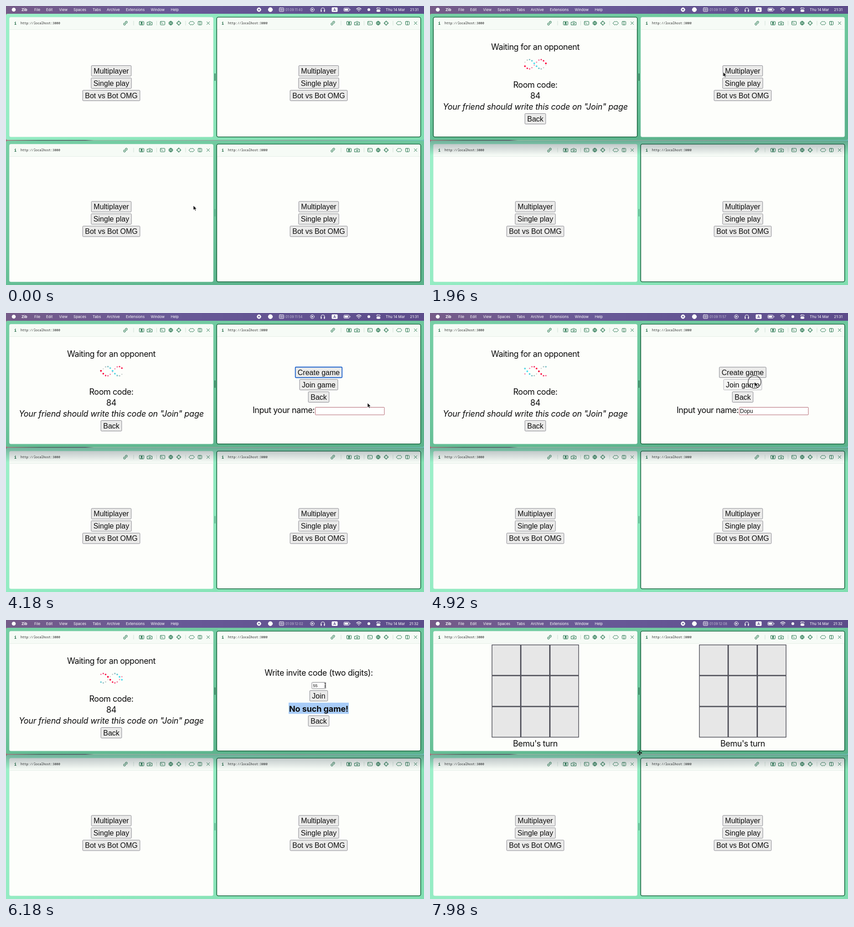
An HTML page that plays this animation: 917x611 px, repeating every 8000 ms.

```html
<!DOCTYPE html>
<html lang="en">
<head>
<meta charset="utf-8">
<title>Two player lobby</title>
<style>
html, body { margin: 0; width: 100%; height: 100%; overflow: hidden; background: #62c898; }
svg { display: block; width: 100vw; height: 100vh; }
text { white-space: pre; }
.bar { font: 8px Inter, sans-serif; fill: #fff; }
.url { font: 6.9px "Noto Sans Mono", monospace; fill: #222; }
.btn { font: 16px "Liberation Sans", Arial, sans-serif; fill: #0c0c0c; text-anchor: middle; }
.val { font: 12px "Liberation Sans", Arial, sans-serif; fill: #111; }
.body { font: 18px Inter, sans-serif; letter-spacing: -.45px; fill: #0c0c0c; text-anchor: middle; }
.hint { font-style: italic; letter-spacing: -.22px; }
.ico { fill: none; stroke: #1d7048; stroke-width: 1; stroke-linejoin: round; stroke-linecap: round; }
.sys { fill: none; stroke: #fff; stroke-width: 1; stroke-linecap: round; }
</style>
</head>
<body>
<svg viewBox="0 0 917 611" preserveAspectRatio="none">
  <defs>
    <linearGradient id="menubar">
      <stop offset="0" stop-color="#755b88"/><stop offset=".4" stop-color="#685997"/>
      <stop offset="1" stop-color="#5c4c8a"/>
    </linearGradient>
    <linearGradient id="bright" x2="1" y2=".4">
      <stop offset="0" stop-color="#9cf0c9"/><stop offset=".5" stop-color="#90eac0"/>
      <stop offset="1" stop-color="#80deb0"/>
    </linearGradient>
    <linearGradient id="deep" x2=".6" y2="1">
      <stop offset="0" stop-color="#76cfa5"/><stop offset=".6" stop-color="#6ac49a"/>
      <stop offset="1" stop-color="#5ab28b"/>
    </linearGradient>
    <linearGradient id="shade" x2="0" y2="1">
      <stop offset="0" stop-color="#123" stop-opacity=".3"/>
      <stop offset="1" stop-color="#123" stop-opacity="0"/>
    </linearGradient>
    <linearGradient id="wall">
      <stop offset="0" stop-color="#b0707c"/><stop offset=".08" stop-color="#4a5a58"/>
      <stop offset=".19" stop-color="#5a4a60"/><stop offset=".21" stop-color="#94b8a4"/>
      <stop offset=".7" stop-color="#93949a"/><stop offset="1" stop-color="#6cc0b8"/>
    </linearGradient>
    <g id="tools" class="ico">
      <g transform="rotate(-45 262 37.5)">
        <path d="M261 35.5h-2a2 2 0 0 0 0 4h2M263 35.5h2a2 2 0 0 1 0 4h-2M260 37.5h4"/>
      </g>
      <path d="M280 33v9M330.500 33v9M394 33v9" stroke="#cfe0d6"/>
      <rect x="292.500" y="34" width="10" height="7.500" rx="1"/>
      <circle cx="297.500" cy="37" r="1.600" fill="#1d7048"/><path d="M295 40h5"/>
      <path d="M310 35.500h2.500l1-1.500h3.500l1 1.500h2.500v6h-10.500z"/><circle cx="315.300" cy="38.200" r="1.700"/>
      <rect x="338.500" y="33.800" width="10" height="7.500" rx="1"/><path d="M340.500 36l1.200 1-1.200 1M343 38h1.500"/>
      <circle cx="361.500" cy="37.500" r="4.200"/>
      <path d="M357.500 36h8M357.500 39h8M361.500 33.500l-2 4 2 4M361.500 33.500l2 4-2 4"/>
      <circle cx="379" cy="37.500" r="3.800"/><path d="M379 32.500v3M379 39.500v3M374 37.500h3M381 37.500h3"/>
      <path d="M401.500 37.500l3.500-3.800h1.200q1.300 2.600 2.600 0h1.200l3.500 3.800-3.500 3.800h-1.200q-1.300-2.600-2.600 0h-1.200z"/>
      <rect x="421.500" y="33.800" width="8" height="7.500" rx="1"/><path d="M425.500 34v7"/>
      <path d="M440.500 34.500l6 6M446.500 34.500l-6 6"/>
    </g>
    <path id="arrow" d="M0 0v10l2.400-2.200 1.600 3.700 1.800-.8-1.600-3.500h3.200z" fill="#000" stroke="#fff" stroke-width=".8"/>
    <path id="beam" d="M-2-5q2 0 2 1.500q0-1.500 2-1.500M0-4v8M-2 5q2 0 2-1.500q0 1.500 2 1.500M-1.200 1h2.400" fill="none" stroke="#222" stroke-width=".9"/>
    <path id="cross" d="M-4 0h8M0-4v8M-3-1.500l-1.500 1.500 1.500 1.500M3-1.500l1.500 1.500-1.500 1.500M-1.500-3l1.500-1.500 1.500 1.500M-1.500 3l1.500 1.500 1.500-1.500" fill="none" stroke="#111" stroke-width="1.300"/>
  </defs>
  <g id="scene"></g>
</svg>
<script>
const scene = document.getElementById('scene');
const ctx = document.createElement('canvas').getContext('2d');
const HOST = 'Bemu', GUEST = 'Dopu';
const LOOP = 8000, GREEN = '#17633c', BLUE = '#1c62cc';

// Steps at which the user presses the mouse
const clicks = [9, 16, 33, 47, 58, 77, 94, 107, 114, 122, 140, 152];
// Pointer path: step, x, y
const path = [
  [1, 411, 437], [3, 411, 437], [8, 240, 146], [11, 240, 146], [15, 253, 222], [27, 253, 222],
  [32, 240, 134], [35, 240, 134], [45, 690, 146], [49, 690, 146], [56, 697, 216], [64, 697, 216],
  [74, 700, 134], [80, 700, 134], [90, 793, 197], [94, 740, 215], [101, 740, 215], [106, 712, 151],
  [110, 712, 151], [114, 690, 143], [119, 690, 143], [121, 688, 168], [124, 688, 168],
  [128, 750, 194], [133, 700, 143], [147, 700, 143], [151, 690, 168], [156, 690, 168],
  [171, 460, 291], [172, 460, 291]
];

const between = (n, a, b) => n >= a && n < b;
const typed = (s, n, from, gap) => s.slice(0, Math.max(0, Math.floor((n - from) / gap) + 1));
const text = (cls, x, y, s, extra = '') => `<text class="${cls}" x="${x}" y="${y}" ${extra}>${s}</text>`;
const rect = (x, y, w, h, attrs) => `<rect x="${x}" y="${y}" width="${w}" height="${h}" ${attrs}/>`;
const move = (x, y, s) => `<g transform="translate(${x} ${y})">${s}</g>`;

function button(label, y, look = '') {
  ctx.font = '16px "Liberation Sans", Arial, sans-serif';
  const w = ctx.measureText(label).width + 10;
  const stroke = look === 'focus' ? BLUE : look === 'pressed' ? '#b4b4ba' : '#85858d';
  return rect(231 - w / 2, y - 11.5, w, 23, `rx="1.5" fill="${look === 'pressed' ? '#f5f5f4' : '#ebebea'}"
    stroke="${stroke}" stroke-width="${look === 'focus' ? 1.8 : 1}"`) + text('btn', 231, y + 5.6, label);
}

const menu = () => button('Multiplayer', 142) + button('Single play', 169) + button('Bot vs Bot OMG', 196);

function form(n, { name, focus, error, create, join }) {
  const border = focus ? BLUE : error ? '#b0626e' : '#85858d';
  let s = button('Create game', 130, create) + button('Join game', 157, join) + button('Back', 184);
  s += text('body', 222, 219, 'Input your name:', 'style="text-anchor:end"');
  s += rect(223.5, 206.5, 151.5, 16.5, `rx="1" fill="#fff" stroke="${border}" stroke-width="${focus ? 1.8 : 1}"`);
  s += text('val', 225, 219.3, name);
  ctx.font = '12px "Liberation Sans", Arial, sans-serif';
  if (focus && n % 6 < 2) s += rect(226 + ctx.measureText(name).width, 208.5, .8, 12.5, 'fill="#333"');
  return s;
}

// Two strands of ten dots, half a turn apart
function helix(n) {
  let s = '';
  for (let i = 0; i < 10; i++) {
    const x = 208.3 + 5.1 * i, a = 2 * Math.PI * (x - 226 + 4.25 * (n - 62)) / 51;
    for (const side of [1, -1]) {
      const front = (1 + side * Math.cos(a)) / 2, mix = (p, q) => Math.round(p + (q - p) * front);
      const [r, g, b, o] = side > 0
        ? [mix(233, 255), mix(12, 0), mix(89, 51), .5 + .5 * front]
        : [mix(53, 70), mix(58, 223), mix(57, 240), .15 + .85 * front];
      s += `<circle cx="${x}" cy="${127.5 + side * 10.3 * Math.sin(a)}" r="${1.25 + .65 * front}"
        fill="rgb(${r},${g},${b})" fill-opacity="${o}"/>`;
    }
  }
  return s;
}

const waiting = n => text('body', 231, 96, 'Waiting for an opponent') + helix(n) +
  text('body', 231, 178.5, 'Room code:') + text('body', 231, 202.5, '84') +
  text('body hint', 231, 227, 'Your friend should write this code on "Join" page') +
  button('Back', 247);

function joinPage(n) {
  const code = n < 140 ? typed('55', n, 115, 3) : typed('84', n, 142, 2);
  const focus = between(n, 114, 122) || between(n, 140, 152), failed = n >= 123;
  let s = text('body', 231, 122, 'Write invite code (two digits):', 'style="letter-spacing:-.35px"');
  s += rect(216, 136.5, 30.5, 14, `rx="1.5" fill="#fff" stroke="${focus ? BLUE : '#808086'}" stroke-width="${focus ? 1.8 : 1}"`);
  s += text('val', 218.5, 146.8, code, 'style="font-size:9px"') + button('Join', 166);
  if (failed) {
    if (between(n, 129, 140)) s += rect(165, 181, 132, 24.5, 'fill="#a8ccf8"');
    s += text('body', 231, 201, 'No such game!', 'style="font-weight:700;letter-spacing:-.1px"');
  }
  return s + button('Back', failed ? 221 : 194);
}

function board() {
  let s = '';
  for (let i = 0; i < 9; i++)
    s += rect(136 + 63.8 * (i % 3), 54.5 + 67.8 * Math.floor(i / 3), 62.5, 66.5,
      'fill="#e7e7e7" stroke="#3b3b46" stroke-width="1.3"');
  return s + text('body', 231, 276.5, HOST + "'s turn");
}

function leftPage(n) {
  if (n < 10) return menu();
  if (n < 34) return form(n, { name: typed(HOST, n, 20, 2), focus: between(n, 16, 33) });
  return n < 154 ? waiting(n) : board();
}

function rightPage(n) {
  if (n < 48) return menu();
  if (n < 109) return form(n, {
    name: typed(GUEST, n, 96, 2),
    focus: between(n, 58, 77) || between(n, 94, 106),
    error: n >= 77,
    create: between(n, 77, 94) ? 'focus' : '',
    join: between(n, 107, 109) ? 'pressed' : ''
  });
  return n < 154 ? joinPage(n) : board();
}

function pane(dx, dy, h, active, page, pageDy = 0) {
  const edge = active ? `stroke="${GREEN}" stroke-width="1.6"` : 'stroke="#d9eee2" stroke-width=".6"';
  return move(dx, dy, rect(7.3, 24.5, 447.4, h, `rx="3.5" fill="#fdfefb" ${edge}`) +
    rect(8.2, 25.5, 445.6, 25.5, 'rx="2.5" fill="#f6fbf6"') +
    rect(8, 51, 446, .7, 'fill="#dce8e0"') +
    text('url', 18, 41, 'i', `style="font-weight:700;font-size:8.5px;fill:${GREEN}"`) +
    text('url', 32, 40, 'http://localhost:3000') + '<use href="#tools"/>') + move(dx, dy + pageDy, page);
}

function menuBar(n) {
  const items = [['File', 62], ['Edit', 88], ['View', 116.5], ['Spaces', 148], ['Tabs', 190], ['Archive', 221],
    ['Extensions', 263], ['Window', 317.5], ['Help', 361.5]];
  const sec = Math.floor(39.85 + n / 6), two = v => String(v).padStart(2, '0');
  const timer = `01:09:${two(11 + Math.floor(sec / 60))}:${two(sec % 60)}`;
  return rect(0, 0, 917, 17, 'fill="url(#menubar)"') +
    '<circle cx="17" cy="8" r="4.3" fill="#fff"/>' +
    text('bar', 34, 11, 'Zib', 'style="font-weight:700"') +
    items.map(([s, x]) => text('bar', x, 11, s)).join('') +
    `<g class="sys">
      <circle cx="555" cy="8" r="4.2" fill="#fff"/><rect x="553.500" y="6.500" width="3" height="3" fill="#5f5193" stroke="none"/>
      <circle cx="580" cy="8" r="4.700" fill="#fff"/>
      <rect x="599.500" y="4" width="10" height="8" rx="1.500"/><path d="M602 6v4M604.500 6v4M607 6v4"/>
      <circle cx="672" cy="8" r="4.200"/><path d="M670.800 6l3 2-3 2z" fill="#fff" stroke-width=".5"/>
      <path d="M691 9.500v-1.500a4 4 0 0 1 8 0v1.500"/><path d="M691.500 9v3M698.500 9v3" stroke-width="2"/>
      <rect x="714.500" y="3" width="13" height="10" rx="2" fill="#fff" stroke="none"/>
      <rect x="741" y="4.500" width="12" height="7" rx="2"/><rect x="742.500" y="6" width="8" height="4" fill="#fff" stroke="none"/>
      <path d="M755 7v2"/>
      <path d="M769 6.500q5-4.500 10 0M771 8.800q3-2.600 6 0" stroke-width="1.400"/><circle cx="774" cy="11" r="1" fill="#fff" stroke="none"/>
      <circle cx="796" cy="8" r="3" fill="#fff" stroke="none"/>
      <rect x="813" y="4" width="8" height="3.200" rx="1.600"/><rect x="813" y="9" width="8" height="3.200" rx="1.600" fill="#fff"/>
    </g>` +
    text('bar', 721, 11, 'A', 'style="fill:#584a8c;font-weight:600;text-anchor:middle"') +
    text('bar', 613, 10.8, timer, 'style="font-size:7.2px" fill-opacity=".62"') +
    text('bar', 833, 11, 'Thu 14 Mar') + text('bar', 905, 11, n < 122 ? '21:31' : '21:32', 'text-anchor="end"');
}

function pointerAt(n) {
  const i = Math.max(1, path.findIndex(p => p[0] >= n));
  const [a, x0, y0] = path[i - 1], [b, x1, y1] = path[i];
  const u = (n - a) / (b - a), k = u * u * (3 - 2 * u);
  return [x0 + (x1 - x0) * k, y0 + (y1 - y0) * k];
}

function pointer(n) {
  const [x, y] = pointerAt(n), px = x > 458 ? x - 455 : x;
  const onName = (between(n, 10, 34) && x < 458 || between(n, 48, 109) && x > 458) &&
    between(px, 223, 376) && between(y, 206, 224);
  const onCode = between(n, 109, 154) && between(px, 216, 248) && between(y, 136, 151);
  const kind = onName || onCode ? 'beam' : between(x, 455, 463) && between(y, 284, 297) ? 'cross' : 'arrow';
  const pressed = clicks.some(c => between(n, c, c + 2));
  return move(x, y, `<use href="#${kind}"/>` +
    (pressed ? '<circle r="14" fill="none" stroke="#222" stroke-width="1.1"/>' : ''));
}

function draw(n) {
  const top = n >= 9, second = n < 9 || n >= 47;
  scene.innerHTML =
    rect(0, 0, 917, 611, 'fill="url(#wall)"') +
    rect(0, 17, 917, 276.5, `rx="4" fill="url(#${top ? 'deep' : 'bright'})"`) +
    rect(0, 295, 917, 320, `rx="4" fill="url(#${top ? 'bright' : 'deep'})"`) +
    pane(0, 0, 262.3, between(n, 9, 47), leftPage(n)) +
    pane(455, 0, 262.3, second, rightPage(n)) +
    pane(0, 278, 301.5, false, menu(), 19.5) +
    pane(455, 278, 301.5, true, menu(), 19.5) +
    (top ? rect(0, 295, 917, 32, 'fill="url(#shade)"') : '') +
    rect(457.5, 147.5, 2, 16.5, 'rx="1" fill="#2c6a4d"') +
    rect(457.5, 444.5, 2, 16.5, 'rx="1" fill="#55a583"') +
    menuBar(n) + pointer(n);
}

function stepAt(ms) {
  const t = ms % LOOP + 20, rest = t % 140;
  return 3 * Math.floor(t / 140) + (rest < 20 ? 0 : rest < 40 ? 1 : 2);
}

let shown = -1;
const begin = performance.now();
function tick() {
  const n = Math.min(172, stepAt(performance.now() - begin));
  if (n !== shown) draw(shown = n);
  requestAnimationFrame(tick);
}
tick();
</script>
</body>
</html>
```
